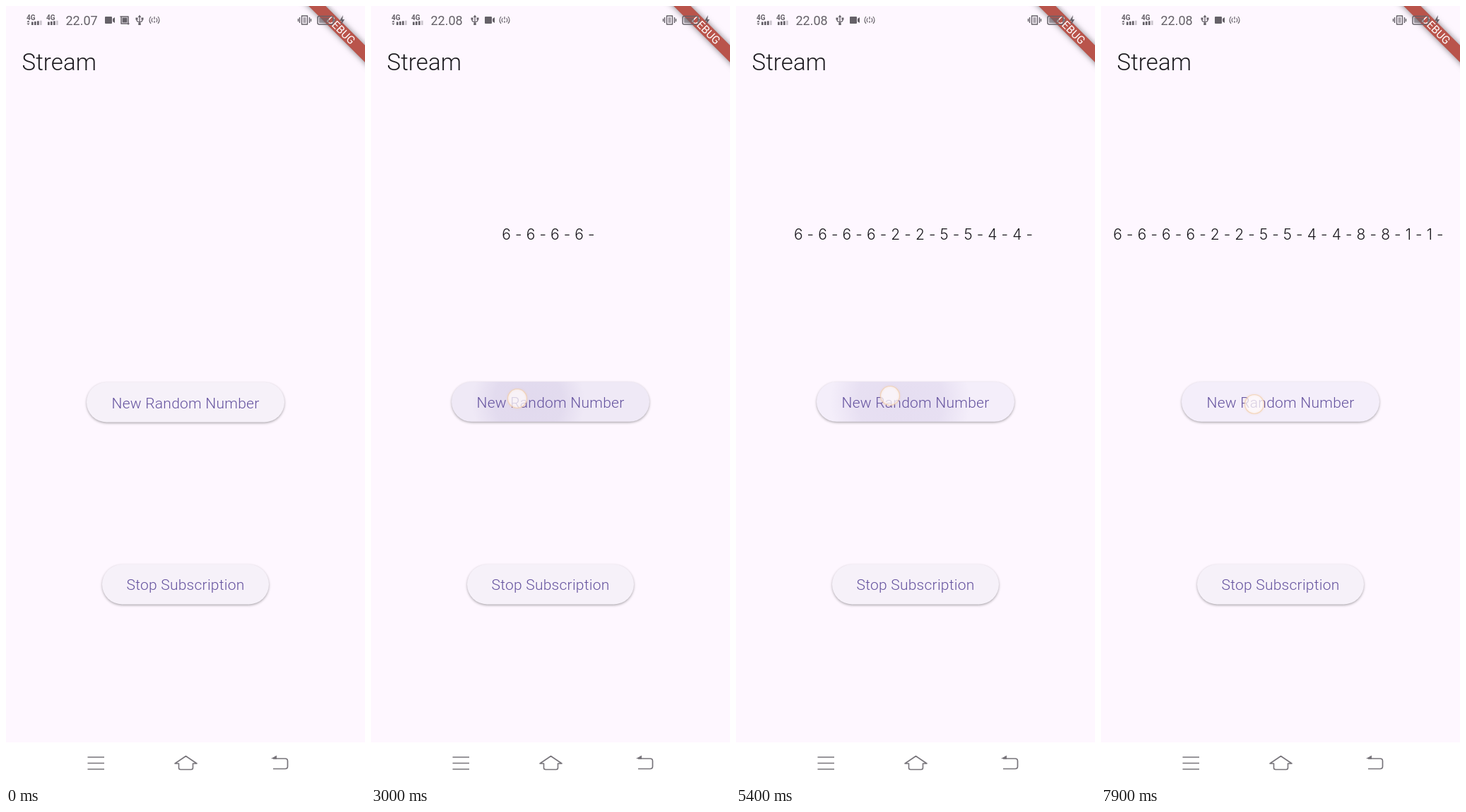
Write an HTML page with a canvas that moves like this. It is 508 px wide and 1102 px high and loops after 8000 ms.

```html
<!DOCTYPE html>
<html lang="en">
<head>
<meta charset="utf-8">
<title>Stream</title>
<style>
  html, body { margin: 0; width: 100%; height: 100%; overflow: hidden; background: #fef7ff; }
  canvas { display: block; width: 508px; height: 1102px; }
</style>
</head>
<body>
<canvas id="stage" width="508" height="1102"></canvas>
<script>
const LOOP = 8000, STEP = 100;
const GREY = '#656168', NAV = '#77747a', INK = '#1d1b20', PURPLE = '#65539f';
const ctx = document.getElementById('stage').getContext('2d');
ctx.lineJoin = 'round';

// Each tap shows a touch dot, starts a ripple and emits its value to both listeners.
const taps = [
  { touch: 1500, x: 208, y: 554.5, ripple: 2100, end: 2300, value: 6, tint: 1 },
  { touch: 2900, x: 207, y: 556, ripple: 2900, end: 3500, value: 6, tint: 1 },
  { touch: 3800, x: 210, y: 556, ripple: 3800, end: 4400, value: 2, tint: 1 },
  { touch: 4600, x: 212, y: 555, ripple: 4600, end: 5200, value: 5, tint: 1 },
  { touch: 5200, x: 218, y: 552, ripple: 5200, end: 6000, value: 4, tint: 0 },
  { touch: 6300, x: 214, y: 553, ripple: 6300, end: 6800, value: 8, tint: 1 },
  { touch: 7000, x: 215, y: 556, ripple: 7000, end: 7600, value: 1, tint: 1 },
  { touch: 7900, x: 217, y: 564, ripple: LOOP, end: LOOP }
];

const clamp = v => Math.max(0, Math.min(1, v));

function text(str, x, y, font, color, align = 'left', spacing = 0) {
  ctx.font = font;
  ctx.fillStyle = color;
  ctx.textAlign = align;
  ctx.letterSpacing = spacing + 'px';
  ctx.fillText(str, x, y);
}

function stroke(path, color = GREY, width = 1.5) {
  ctx.strokeStyle = color;
  ctx.lineWidth = width;
  ctx.stroke(new Path2D(path));
}

function fill(path, color = GREY) {
  ctx.fillStyle = color;
  ctx.fill(new Path2D(path));
}

function at(x, y, draw) {
  ctx.save();
  ctx.translate(x, y);
  draw();
  ctx.restore();
}

// Status icons, each centred on the origin.
const icons = {
  video() {
    fill('M-6-5H2Q3-5 3-4V4Q3 5 2 5H-6Q-7 5-7 4V-4Q-7-5-6-5ZM4-2L7-4V4L4 2Z');
  },
  crop() {
    fill('M-3.5-3.5H3.5V3.5H-3.5Z');
    stroke('M-6.5-5H5V6.5M-5-5V5H6.5');
  },
  usb() {
    stroke('M0-5V5M-4-2V0Q-4 2 0 3Q4 2 4 0V-2', GREY, 1.3);
    fill('M0-7.5L2.3-4H-2.3ZM-5.5-3.5H-2.5V-.5H-5.5ZM2.5-3.5H5.5V-.5H2.5ZM-1.7 4H1.7V7H-1.7Z');
  },
  hotspot() {
    stroke('M-5-5Q-9 0-5 5M5-5Q9 0 5 5M-2.7-3Q-5 0-2.7 3M2.7-3Q5 0 2.7 3M0-5V-1M0 1V4', GREY, 1.2);
  }
};

function signal(x, arrows) {
  text('4G', x, 20, 'bold 10px Roboto, sans-serif', GREY);
  const first = arrows ? 7 : 2;
  for (let bar = 0; bar < 4; bar++) {
    const h = 4.5 + bar * 0.6;
    ctx.fillStyle = bar === 3 ? '#cbc5cd' : GREY;
    ctx.fillRect(x + first + bar * 4, 27 - h, 2.7, h);
  }
  if (arrows) fill(`M${x + 2.5} 20.5l2 2.5h-4zM${x + 2.5} 27l2-2.5h-4z`);
}

function statusBar(t) {
  signal(29, true);
  signal(57, false);
  const later = t >= 2100;
  text(later ? '22.08' : '22.07', 84.5, 27, '18px Roboto, sans-serif', GREY);
  const row = later ? ['usb', 'video', 'hotspot']
    : t >= 500 ? ['crop', 'usb', 'video', 'hotspot']
    : ['video', 'crop', 'usb', 'hotspot'];
  row.forEach((name, i) => at(147 + i * 21, 20, icons[name]));

  stroke('M418.5 14H426.5V26H418.5ZM415.5 16V24M429.5 16V24M413.5 18V22M431.5 18V22', GREY, 1.4);
  fill('M420.5 16H424.5V24H420.5Z', '#a9a3ab');
  stroke('M443 14.5H461Q463 14.5 463 16.5V24Q463 26 461 26H443Q441 26 441 24V16.5Q441 14.5 443 14.5ZM465 18V22.5');
  fill('M443 16.5H457V24H443Z', 'rgba(101,97,104,.6)');
  fill('M477 13L472 21H475L474 27L479 19H476Z');
}

function banner() {
  at(474.1, 33.9, () => {
    ctx.rotate(Math.PI / 4);
    ctx.shadowColor = 'rgba(0,0,0,.5)';
    ctx.shadowBlur = 9;
    ctx.fillStyle = '#b9544b';
    ctx.fillRect(-80, -8.5, 160, 17);
    ctx.shadowColor = 'transparent';
    text('DEBUG', 0, 5.5, '15.5px Roboto, sans-serif', '#fff', 'center');
  });
}

function button(label, x, y, w, color, baseline, overlay) {
  const shape = new Path2D();
  shape.roundRect(x, y, w, 56.5, 28.25);
  ctx.save();
  ctx.shadowColor = 'rgba(0,0,0,.32)';
  ctx.shadowBlur = 3.5;
  ctx.shadowOffsetY = 1.4;
  ctx.fillStyle = color;
  ctx.fill(shape);
  ctx.restore();
  if (overlay) {
    ctx.save();
    ctx.clip(shape);
    overlay();
    ctx.restore();
  }
  text(label, 254, baseline, '350 21px Roboto, sans-serif', PURPLE, 'center', 0.25);
}

function ripple(tap, phase) {
  const alpha = 0.1 * clamp(3 - phase);
  const radius = 42 + 38 * phase;
  const x = tap.x + (254 - tap.x) * clamp(0.2 + 0.13 * phase);
  const glow = ctx.createRadialGradient(x, 560, 0, x, 560, radius);
  glow.addColorStop(0, `rgba(103,80,164,${alpha})`);
  glow.addColorStop(0.6, `rgba(103,80,164,${alpha * 0.9})`);
  glow.addColorStop(1, 'rgba(103,80,164,0)');
  ctx.fillStyle = glow;
  ctx.fillRect(100, 520, 310, 80);
}

function randomButton(t) {
  const started = t >= 2100;
  const active = taps.find(tap => t >= tap.ripple && t < tap.end);
  const phase = active ? 6 * (t - active.ripple) / (active.end - active.ripple) : 0;
  const rise = 0.5 + 0.5 * clamp(phase - 2);
  const level = active ? active.tint * rise * clamp((6 - phase) / 3) : 0;
  const color = started
    ? `rgb(${244 - 10 * level},${238 - 10 * level},${250 - 9 * level})`
    : '#f6f1f9';
  const shift = started ? 0.7 : 0;
  button('New Random Number', 114, 533 - shift, 280, color, 570 - shift,
    active && (() => ripple(active, phase)));
}

function touchDot({ x, y }) {
  ctx.save();
  ctx.beginPath();
  ctx.arc(x, y, 13.5, 0, 2 * Math.PI);
  ctx.fillStyle = 'rgba(255,250,250,.75)';
  ctx.fill();
  ctx.shadowColor = 'rgba(245,190,140,.5)';
  ctx.shadowBlur = 3;
  ctx.strokeStyle = 'rgba(242,205,170,.75)';
  ctx.lineWidth = 1.2;
  ctx.stroke();
  ctx.restore();
}

function navBar() {
  ctx.fillStyle = '#fff';
  ctx.fillRect(0, 1043, 508, 59);
  stroke('M115.5 1064H139M115.5 1072.5H139M115.5 1081H139', NAV, 1.6);
  stroke('M244.5 1073H239L254.5 1062.5L270 1073H264.5V1079Q264.5 1081.5 262 1081.5H247Q244.5 1081.5 244.5 1079Z',
    NAV, 1.6);
  stroke('M244.5 1073V1073.1', NAV, 1.6);
  stroke('M378 1080.5H395Q398.5 1080.5 398.5 1077V1069.5Q398.5 1066 395 1066H378', NAV, 1.7);
  fill('M375 1066L383 1061.5V1066.8Z', NAV);
}

function draw(t) {
  ctx.fillStyle = '#fef7ff';
  ctx.fillRect(0, 0, 508, 1102);
  banner();
  statusBar(t);
  text('Stream', 22.5, 91, '350 33px Roboto, sans-serif', INK, 'left', 0.1);

  const numbers = taps.filter(tap => t >= tap.ripple + STEP)
    .map(tap => `${tap.value} - `.repeat(2)).join('');
  text(numbers, 254, 331, '350 21px Inter, sans-serif', INK, 'center', 0.1);

  randomButton(t);
  button('Stop Subscription', 136, 791, 236, '#f6f1f9', 827);
  taps.filter(tap => t >= tap.touch && t < tap.touch + 300).forEach(touchDot);
  navBar();
}

function tick() {
  const t = performance.now() % LOOP;
  draw(Math.floor(t / STEP) * STEP);
  requestAnimationFrame(tick);
}
tick();
</script>
</body>
</html>
```
